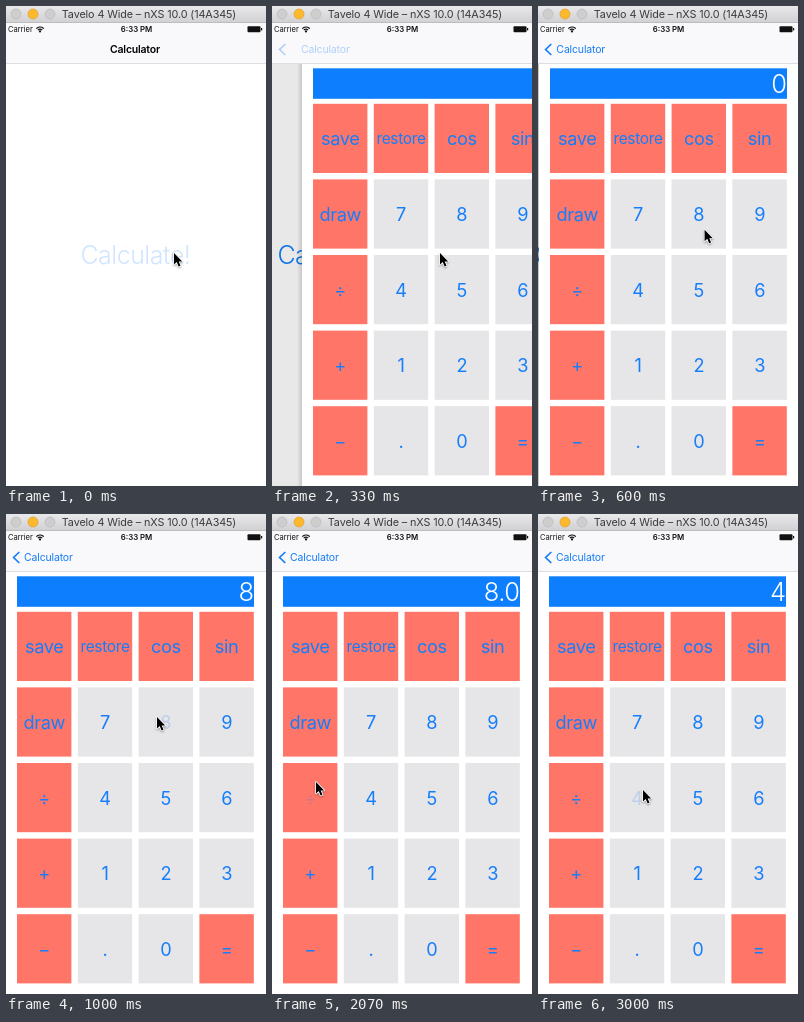
An HTML page with a canvas for the animation above (3070 ms loop, 260 px wide and 480 px high).

```html
<!DOCTYPE html>
<html lang="en">
<head>
<meta charset="utf-8">
<title>Calculator demo</title>
<style>
  html, body { margin: 0; width: 100%; height: 100%; overflow: hidden; background: #fff; }
  canvas { display: block; width: 260px; height: 480px; }
</style>
</head>
<body>
<canvas id="stage"></canvas>
<script>
const W = 260, H = 480, LOOP = 3070, STEP = 1000 / 15;
const BLUE = '#147efb', SALMON = '#ff7568', GREY = '#e6e5e7', BAR = '#f9f8fa';
const KEYS = [
  ['save', 'restore', 'cos', 'sin'],
  ['draw', '7', '8', '9'],
  ['÷', '4', '5', '6'],
  ['+', '1', '2', '3'],
  ['−', '.', '0', '=']
];
// Page offset of the push, one value per step
const PUSH = [260, 260, 260, 179, 77, 30, 13.5, 6, 2.7, 1];
// Pointer stops: time, x, y
const PATH = [
  [0, 168, 247], [400, 168, 247], [467, 175, 235], [800, 151, 203],
  [1110, 151, 203], [1670, 44, 268], [2180, 44, 268], [2800, 105, 276], [LOOP, 105, 276]
];
// Key presses: label, time down, time up
const TAPS = [['8', 930, 1000], ['÷', 1995, 2065], ['4', 2930, 3000]];

const canvas = document.getElementById('stage');
const dpr = window.devicePixelRatio || 1;
canvas.width = W * dpr;
canvas.height = H * dpr;
const ctx = canvas.getContext('2d');
ctx.scale(dpr, dpr);

const clamp = v => Math.max(0, Math.min(1, v));
const smooth = v => v * v * (3 - 2 * v);

function rect(x, y, w, h, color) {
  ctx.fillStyle = color;
  ctx.fillRect(x, y, w, h);
}

function disc(x, y, r, fill, stroke) {
  ctx.beginPath();
  ctx.arc(x, y, r, 0, Math.PI * 2);
  ctx.fillStyle = fill;
  ctx.fill();
  ctx.strokeStyle = stroke;
  ctx.lineWidth = 0.7;
  ctx.stroke();
}

// Text is centred vertically on y by its cap height
function text(str, x, y, size, color, { weight = 400, align = 'center', alpha = 1, track = -0.02 } = {}) {
  ctx.globalAlpha = alpha;
  ctx.font = `${weight} ${size}px Inter, Roboto, sans-serif`;
  ctx.letterSpacing = `${track * size}px`;
  ctx.textAlign = align;
  ctx.fillStyle = color;
  ctx.fillText(str, x, y + size * 0.363);
  ctx.globalAlpha = 1;
}

function keyAlpha(label, t) {
  const tap = TAPS.find(k => k[0] === label);
  if (!tap || t < tap[1]) return 1;
  const u = clamp((t - tap[2]) / 270);
  return 0.2 + 0.8 * u * u;
}

function displayText(t) {
  if (t < 995) return '0';
  if (t < 2060) return '8';
  return t < 2995 ? '8.0' : '4';
}

function drawWindowBar() {
  const g = ctx.createLinearGradient(0, 0, 0, 17);
  g.addColorStop(0, '#e9e8ea');
  g.addColorStop(1, '#d0cfd1');
  rect(0, 0, W, 17, g);
  rect(0, 16, W, 1, '#bdbcbe');
  disc(10, 8, 5, '#cfcecf', '#bab9ba');
  disc(27, 8, 5, '#fdb92e', '#e0a029');
  disc(44, 8, 5, '#cfcecf', '#bab9ba');
  text('Tavelo 4 Wide – nXS 10.0 (14A345)', 143, 8, 10.8, '#3b3a3c', { track: -0.01 });
}

function drawStatus() {
  text('Carrier', 2, 23.3, 7.6, '#111', { align: 'left', track: 0 });
  text('6:33 PM', 130.5, 23.3, 7.8, '#111', { weight: 600, track: 0 });
  ctx.strokeStyle = '#111';
  ctx.lineWidth = 1.1;
  for (const r of [2.9, 5]) {
    ctx.beginPath();
    ctx.arc(34, 26, r, -Math.PI * 0.77, -Math.PI * 0.23);
    ctx.stroke();
  }
  ctx.beginPath();
  ctx.arc(34, 25.4, 1.1, 0, Math.PI * 2);
  ctx.fillStyle = '#111';
  ctx.fill();
  ctx.beginPath();
  ctx.roundRect(241.5, 20.2, 13, 6, 1);
  ctx.fill();
  rect(255, 22, 1.2, 2.4, '#111');
}

function drawNav(t, q) {
  rect(0, 17, W, 41, BAR);
  rect(0, 57, W, 0.7, '#d2d1d4');
  drawStatus();
  const x = 18 + 86 * Math.min(1, 1.1 * q);
  const titleAlpha = clamp(1 - 1.75 * (1 - q));
  const backAlpha = clamp((t - 270) / 200);
  if (titleAlpha) text('Calculator', x, 43.5, 10.5, '#000', { weight: 600, align: 'left', alpha: titleAlpha });
  if (backAlpha) {
    text('Calculator', x, 43.5, 10.5, BLUE, { align: 'left', alpha: backAlpha, track: -0.015 });
    ctx.globalAlpha = backAlpha;
    ctx.strokeStyle = BLUE;
    ctx.lineWidth = 1.7;
    ctx.beginPath();
    ctx.moveTo(13.3, 38);
    ctx.lineTo(7.6, 43.5);
    ctx.lineTo(13.3, 49);
    ctx.stroke();
    ctx.globalAlpha = 1;
  }
}

function drawStart(t, q) {
  const u = clamp((t - 70) / 263);
  text('Calculate!', 129.3 - 0.3 * W * (1 - q), 249, 25, BLUE,
    { weight: 300, alpha: 0.2 + 0.8 * u * u });
  rect(0, 58, W, H - 58, `rgba(0,0,0,${0.1 * (1 - q)})`);
}

function drawKeypad(t, off) {
  if (off > 0) {
    const g = ctx.createLinearGradient(off - 5, 0, off, 0);
    g.addColorStop(0, 'rgba(0,0,0,0)');
    g.addColorStop(1, 'rgba(0,0,0,.14)');
    rect(off - 5, 58, 5, H - 58, g);
  }
  ctx.save();
  ctx.translate(off, 0);
  rect(0, 58, W, H - 58, '#fff');
  rect(11, 62.3, 237, 30.5, '#0d7efd');
  text(displayText(t), 247.5, 78, 25.5, '#fff', { weight: 300, align: 'right' });
  KEYS.forEach((row, r) => row.forEach((label, c) => {
    const x = 11 + c * 60.8, y = 97.8 + r * 75.6;
    const warm = r === 0 || c === 0 || label === '=';
    rect(x, y, 54.4, 69.2, warm ? SALMON : GREY);
    text(label, x + 27.2, y + 34.9, label === 'restore' ? 15.4 : 18.2, BLUE,
      { alpha: keyAlpha(label, t) });
  }));
  ctx.restore();
}

function drawPointer(t) {
  const i = PATH.findIndex(p => p[0] > t);
  const [t0, x0, y0] = PATH[i - 1], [t1, x1, y1] = PATH[i];
  const u = smooth((t - t0) / (t1 - t0));
  ctx.save();
  ctx.translate(x0 + (x1 - x0) * u, y0 + (y1 - y0) * u);
  const arrow = new Path2D('M0 0V11.6L2.7 9.1L4.6 13.5L6.5 12.7L4.7 8.4H8.2Z');
  ctx.strokeStyle = '#fff';
  ctx.lineWidth = 1.6;
  ctx.lineJoin = 'round';
  ctx.shadowColor = 'rgba(0,0,0,.35)';
  ctx.shadowBlur = 2 * dpr;
  ctx.shadowOffsetY = dpr;
  ctx.stroke(arrow);
  ctx.shadowColor = 'transparent';
  ctx.fillStyle = '#000';
  ctx.fill(arrow);
  ctx.restore();
}

function draw(step) {
  const t = step * STEP;
  const off = PUSH[step] ?? 0, q = off / W;
  rect(0, 0, W, H, '#fff');
  drawStart(t, q);
  if (off < W) drawKeypad(t, off);
  drawNav(t, q);
  drawWindowBar();
  drawPointer(t);
}

const start = performance.now();
function tick() {
  const t = (performance.now() - start) % LOOP;
  draw(Math.min(45, Math.floor((t + 5) / STEP)));
  requestAnimationFrame(tick);
}
tick();
</script>
</body>
</html>
```
